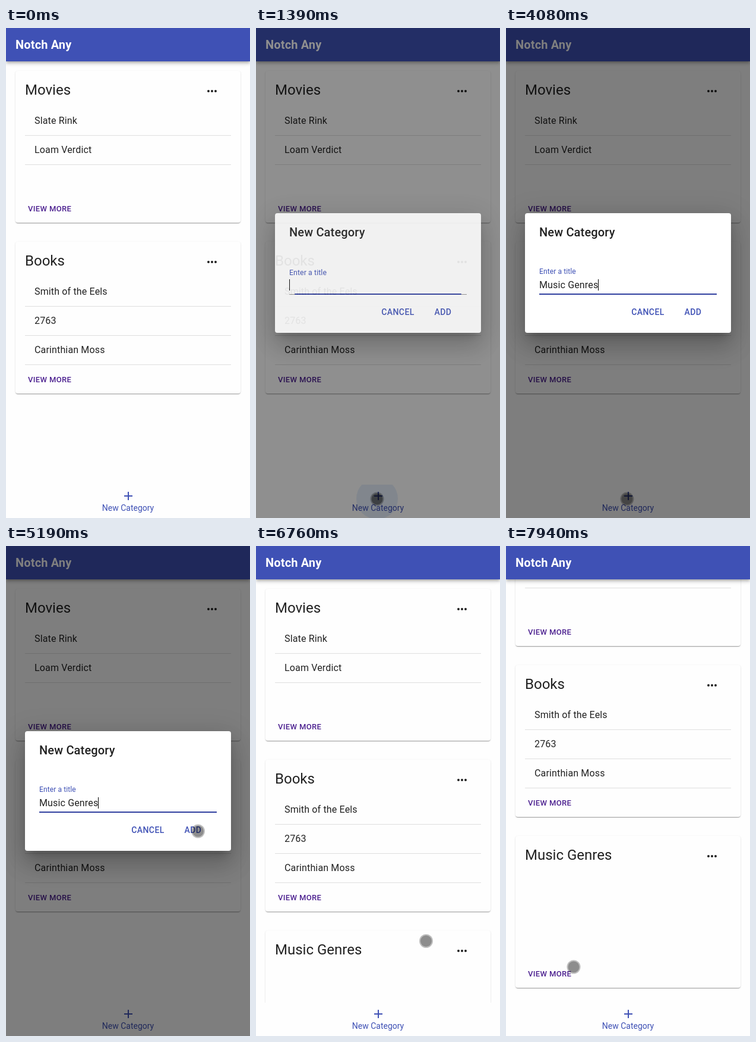
Animation of 411 by 823 pixels, one loop 8000 ms. Source, as an HTML page:

```html
<!DOCTYPE html>
<html lang="en">
<head>
<meta charset="utf-8">
<title>Category lists</title>
<style>
  html, body { margin: 0; width: 100%; height: 100%; overflow: hidden; background: #fefefe; }
  body { font: 400 16px Roboto, sans-serif; color: rgba(0,0,0,.87); }
  #stage { position: relative; width: 411px; height: 823px; overflow: hidden; background: #fefefe; }
  #stage div, #stage svg, #stage i { position: absolute; white-space: pre; }

  .bar { left: 0; top: 0; width: 411px; height: 56px; background: #3f51b5;
    box-shadow: 0 2px 4px -1px rgba(0,0,0,.2), 0 4px 5px rgba(0,0,0,.14), 0 1px 10px rgba(0,0,0,.12); }
  .bar div { left: 16px; top: 12px; color: #fff; font: 700 20px/32px Roboto, sans-serif; letter-spacing: .0075em; }

  #page { left: 0; top: 0; width: 411px; }
  .card { left: 16px; width: 379px; height: 255px; border-radius: 4px; background: #fefefe;
    box-shadow: 0 2px 1px -1px rgba(0,0,0,.2), 0 1px 1px rgba(0,0,0,.14), 0 1px 3px rgba(0,0,0,.12); }
  .head { left: 16px; top: 16px; font-size: 24px; line-height: 32px; }
  .dots { left: 319px; top: 22px; }
  .item { left: 16px; width: 331px; height: 48px; padding-left: 16px; line-height: 48px;
    letter-spacing: .00938em; border-bottom: 1px solid rgba(0,0,0,.12); }
  .more { left: 21px; top: 220px; font: 500 13px/23px Roboto, sans-serif; letter-spacing: .02857em; color: #4b1f8f; }

  #nav { left: 0; top: 767px; width: 411px; height: 56px; background: #fefefe; color: #3f51b5; }
  #nav svg { left: 194px; top: 7px; }
  #nav .label { left: 0; width: 411px; top: 29px; text-align: center; font-size: 14px; line-height: 20px; }
  .clip { overflow: hidden; border-radius: 4px; }
  #nav .clip { left: 122px; top: 0; width: 168px; height: 56px; }
  .ripple { border-radius: 50%; }
  #navRipple { background: #3f8ae6; }
  #addRipple { background: #3f51b5; }

  #shade { left: 0; top: 0; width: 411px; height: 823px; background: rgba(0,0,0,.5); }
  #dialog { left: 32px; top: 311px; width: 347px; height: 201px; border-radius: 4px; background: #fff;
    box-shadow: 0 11px 15px -7px rgba(0,0,0,.2), 0 24px 38px 3px rgba(0,0,0,.14), 0 9px 46px 8px rgba(0,0,0,.12); }
  #dialog .title { left: 24px; top: 16px; font: 500 20px/32px Roboto, sans-serif; letter-spacing: .0075em; }
  #hint { left: 24px; top: 91px; line-height: 16px; letter-spacing: .00938em; transform-origin: 0 0; }
  #field { left: 24px; top: 111px; height: 19px; line-height: 19px; letter-spacing: .00938em; }
  #field #caret { right: -1px; top: 0; width: 1px; height: 19px; background: #000; }
  .rule { left: 24px; top: 136px; width: 299px; height: 1px; background: rgba(0,0,0,.42); }
  #focus { left: 24px; top: 135px; width: 299px; height: 2px; background: #303f9f; }
  .btn { top: 148px; height: 36px; line-height: 36px; text-align: center; font-size: 14px; font-weight: 500;
    letter-spacing: .02857em; color: #3f51b5; }
  .cancel { left: 171px; width: 72px; }
  .add { left: 251px; width: 64px; }

  #thumb { left: 405px; top: 6px; width: 3px; height: 680px; border-radius: 2px; background: rgba(0,0,0,.35); }
  #dot { left: -11.5px; top: -11.5px; width: 23px; height: 23px; border-radius: 50%; background: rgba(0,0,0,.25); }
  #dot i { left: 2px; top: 2px; width: 19px; height: 19px; border-radius: 50%; background: #000; }
</style>
</head>
<body>
<div id="stage">
  <div id="page"></div>
  <div id="nav">
    <div class="clip"><div class="ripple" id="navRipple"></div></div>
    <svg width="24" height="24"><path d="M19 13h-6v6h-2v-6H5v-2h6V5h2v6h6z" fill="#3f51b5"/></svg>
    <div class="label">New Category</div>
  </div>
  <div class="bar"><div>Notch Any</div></div>
  <div id="thumb"></div>
  <div id="shade"></div>
  <div id="dialog">
    <div class="title">New Category</div>
    <div id="hint">Enter a title</div>
    <div id="field"><span id="typed"></span><i id="caret"></i></div>
    <div class="rule"></div>
    <div id="focus"></div>
    <div class="btn cancel">CANCEL</div>
    <div class="btn add clip"><div class="ripple" id="addRipple"></div></div>
    <div class="btn add">ADD</div>
  </div>
  <div id="dot"><i></i></div>
</div>
<script>
const $ = id => document.getElementById(id);
const LOOP = 8000, APPEAR = 450, OPEN = 1261, CLOSE = 5976;
const DRAG = 6780, SCROLL = 159;

// Typing comes in bursts of evenly spaced keys
const BURSTS = [
  { at: 2570, gap: 0, text: 'M' },
  { at: 2800, gap: 80, text: 'usic G' },
  { at: 3440, gap: 100, text: 'enres' }
];
const KEYS = BURSTS.flatMap(b => [...b.text].map((_, i) => b.at + i * b.gap));
const NAME = BURSTS.map(b => b.text).join('');

// The pointer glides from rest to rest
const ENTRY = { x: 247, y: 780 };
const GLIDES = [
  { at: APPEAR, ms: 310, x: 196.5, y: 790.5 },
  { at: 840, ms: 160, x: 203.5, y: 790.5 },
  { at: 4070, ms: 90, x: 194.5, y: 792.5 },
  { at: 4250, ms: 930, x: 323, y: 478.5 },
  { at: 6290, ms: 460, x: 286, y: 663 },
  { at: DRAG, ms: 370, x: 284, y: 663 - SCROLL },
  { at: 7480, ms: 460, x: 113.5, y: 706.5 }
];

const clamp = x => Math.min(1, Math.max(0, x));

// Timing curve through (x1, 0) and (x2, 1)
function ease(x1, x2) {
  return x => {
    x = clamp(x);
    let lo = 0, hi = 1, s = x;
    for (let i = 0; i < 24; i++) {
      s = (lo + hi) / 2;
      const at = 3 * (1 - s) ** 2 * s * x1 + 3 * (1 - s) * s * s * x2 + s ** 3;
      if (at < x) lo = s; else hi = s;
    }
    return 3 * (1 - s) * s * s + s ** 3;
  };
}
const standard = ease(.4, .2), settle = ease(0, .2), glide = ease(.42, .58);

function card(index, title, items) {
  const rows = items.map((text, i) => `<div class="item" style="top:${60 + i * 49}px">${text}</div>`).join('');
  return `<div class="card" style="top:${72 + index * 287}px">
    <div class="head">${title}</div>
    <svg class="dots" width="24" height="24"><path d="M6 12h0M12 12h0M18 12h0" stroke="#212121" stroke-width="4" stroke-linecap="round"/></svg>
    ${rows}<div class="more">VIEW MORE</div></div>`;
}
$('page').innerHTML =
  card(0, 'Movies', ['Slate Rink', 'Loam Verdict']) +
  card(1, 'Books', ['Smith of the Eels', '2763', 'Carinthian Moss']) +
  card(2, NAME, []);
const added = $('page').lastElementChild;

function pointerAt(t) {
  return GLIDES.reduce((p, g) => {
    const k = glide((t - g.at) / g.ms);
    return { x: p.x + (g.x - p.x) * k, y: p.y + (g.y - p.y) * k };
  }, ENTRY);
}

function ripple(el, t, start, release, x, y, size, alpha) {
  const r = size * standard((t - start) / 550);
  Object.assign(el.style, {
    left: x - r + 'px', top: y - r + 'px', width: 2 * r + 'px', height: 2 * r + 'px',
    opacity: t < start ? 0 : alpha * (1 - standard((t - release) / 550))
  });
}

function drawPage(t) {
  const moved = SCROLL * glide((t - DRAG) / 370);
  $('page').style.transform = `translateY(${-Math.round(moved)}px)`;
  added.style.display = t >= CLOSE ? '' : 'none';
  $('thumb').style.transform = `translateY(${128 * moved / SCROLL}px)`;
  $('thumb').style.opacity = t < DRAG ? 0 : 1 - clamp((t - 7480) / 240);
  ripple($('navRipple'), t, 1220, OPEN, 82, 23.5, 82, .16);
}

function drawDialog(t) {
  const closing = t >= CLOSE;
  const shown = closing ? 1 - standard((t - CLOSE) / 195) : standard((t - OPEN) / 225);
  $('shade').style.opacity = $('dialog').style.opacity = shown;

  const rest = closing ? settle((t - CLOSE) / 200) : 1 - settle((t - OPEN) / 200);
  $('hint').style.transform = `translateY(${1.5 + 21 * rest}px) scale(${.75 + .25 * rest})`;
  $('hint').style.color = closing ? 'rgba(0,0,0,.54)' : '#3f51b5';
  $('focus').style.transform = `scaleX(${closing ? 0 : settle((t - OPEN) / 200)})`;

  const count = KEYS.filter(k => k <= t).length;
  $('typed').textContent = closing ? '' : NAME.slice(0, count);
  const since = t - (count ? KEYS[count - 1] : OPEN);
  $('caret').style.opacity = !closing && since % 1000 < 500 ? 1 : 0;
  ripple($('addRipple'), t, 5775, 5960, 40, 19, 45.6, .09);
}

function drawPointer(t) {
  const { x, y } = pointerAt(t);
  const pressed = (t > 1150 && t < 2490) || (t > 5650 && t < 6250);
  $('dot').style.display = t < APPEAR ? 'none' : '';
  $('dot').style.transform = `translate(${x}px, ${y}px)`;
  $('dot').firstChild.style.opacity = pressed ? .36 : .26;
}

// The picture advances in even steps after the first rest
function stepped(t) {
  return t < 436 ? 0 : APPEAR + 78.85 * Math.floor((t - 436) / 78.85);
}

let start;
function tick(now) {
  start ??= now;
  const t = stepped((now - start) % LOOP);
  drawPage(t);
  drawDialog(t);
  drawPointer(t);
  requestAnimationFrame(tick);
}
requestAnimationFrame(tick);
</script>
</body>
</html>
```
